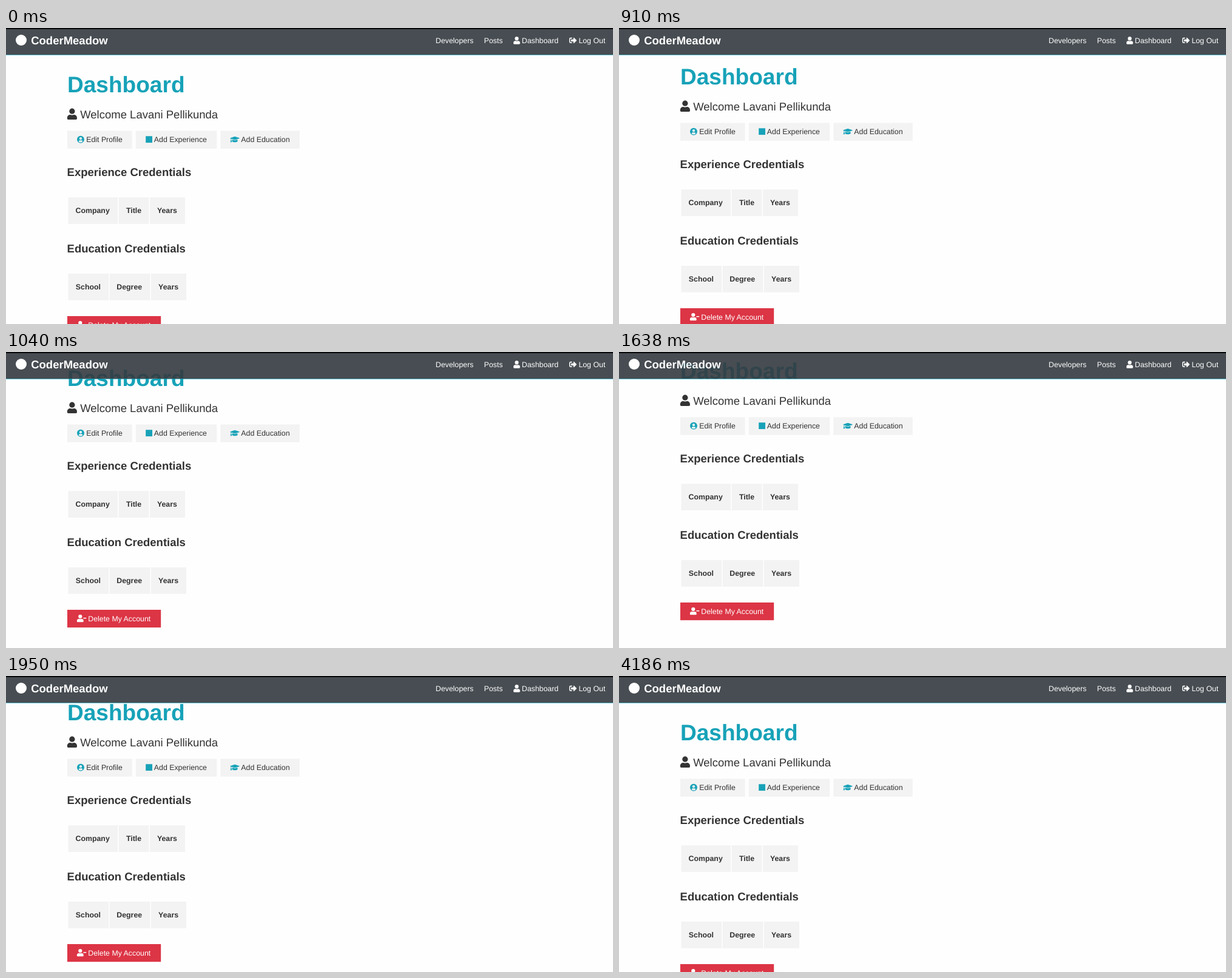
These frames come from a looping animation (1000 by 488 pixels, 5.59 s). An HTML page:

```html
<!DOCTYPE html>
<html lang="en">
<head>
<meta charset="utf-8">
<title>Dashboard</title>
<style>
  html, body { margin: 0; width: 100%; height: 100%; overflow: hidden; background: #fefefe; }
  svg { display: block; width: 100%; height: 100%; }
  text { font: 12.35px "Liberation Sans", Arial, sans-serif; text-rendering: geometricPrecision; }
  .large { font-size: 18.5px; }
  .bold { font-weight: bold; }
  .title { font-size: 37.1px; font-weight: bold; }
  .teal { fill: #17a2b8; }
  .white { fill: #fff; }
  .panel { fill: #f3f3f3; }
</style>
</head>
<body>
<svg viewBox="0 0 1000 488">
  <defs>
    <!-- Icons are drawn on a 512-unit em square. -->
    <g id="user">
      <circle cx="224" cy="128" r="128"/>
      <path d="M134 288h17a175 175 0 0 0 146 0h17A134 134 0 0 1 448 422v42a48 48 0 0 1-48 48H48a48 48 0 0 1-48-48v-42A134 134 0 0 1 134 288z"/>
    </g>
    <g id="userMinus">
      <use href="#user"/>
      <rect x="432" y="208" width="208" height="64" rx="16"/>
    </g>
    <g id="userCircle">
      <circle cx="248" cy="256" r="248"/>
      <g class="panel">
        <circle cx="248" cy="192" r="88"/>
        <path d="M106 392a122 122 0 0 1 94-80q48 16 96 0a122 122 0 0 1 94 80a192 192 0 0 1-284 0z"/>
      </g>
    </g>
    <g id="cap">
      <path d="M297 67a80 80 0 0 1 46 0l279 86q36 23 0 46L343 285a80 80 0 0 1-46 0L18 199q-36-23 0-46z"/>
      <path d="M145 272l143 44a110 110 0 0 0 64 0l143-44 17 112c0 35-86 64-192 64s-192-29-192-64z"/>
      <path d="M48 200h32v112a32 32 0 0 1 14 46l26 90H8l26-90a32 32 0 0 1 14-46z"/>
    </g>
    <g id="signOut">
      <path d="M497 273L329 441c-15 15-41 4-41-17v-96H152a24 24 0 0 1-24-24v-96a24 24 0 0 1 24-24h136V88c0-21 26-32 41-17l168 168a24 24 0 0 1 0 34z"/>
      <path d="M192 96H96a64 64 0 0 0-64 64v192a64 64 0 0 0 64 64h96" fill="none" stroke="#fff" stroke-width="64"/>
    </g>
  </defs>

  <rect width="1000" height="488" fill="#fefefe"/>

  <g id="page" fill="#333">
    <text class="title teal" x="100.9" y="106.3">Dashboard</text>
    <use href="#user" transform="translate(100.8 132.6) scale(.0361)"/>
    <text class="large" x="122.2" y="148.8">Welcome Lavani Pellikunda</text>

    <g class="panel">
      <rect x="101" y="169.5" width="106.7" height="29.3"/>
      <rect x="213.7" y="169.5" width="133.5" height="29.3"/>
      <rect x="353.3" y="169.5" width="130.5" height="29.3"/>
    </g>
    <g class="teal">
      <use href="#userCircle" transform="translate(117 177.5) scale(.0241)"/>
      <rect x="230.2" y="178.3" width="10.8" height="10.8"/>
      <use href="#cap" transform="translate(369.3 177.5) scale(.0241)"/>
    </g>
    <text x="132.2" y="188.3">Edit Profile</text>
    <text x="243.8" y="188.3">Add Experience</text>
    <text x="387.3" y="188.3">Add Education</text>

    <text class="large bold" x="100.6" y="244.2">Experience Credentials</text>
    <g class="panel">
      <rect x="102.6" y="279.2" width="81.4" height="43.8"/>
      <rect x="185.6" y="279.2" width="49.8" height="43.8"/>
      <rect x="237" y="279.2" width="58" height="43.8"/>
    </g>
    <text class="bold" x="114.5" y="305.3">Company</text>
    <text class="bold" x="197.9" y="305.3">Title</text>
    <text class="bold" x="248.9" y="305.3">Years</text>

    <text class="large bold" x="100.6" y="370.1">Education Credentials</text>
    <g class="panel">
      <rect x="102.6" y="405" width="66.6" height="43.8"/>
      <rect x="170.7" y="405" width="66.8" height="43.8"/>
      <rect x="239" y="405" width="58" height="43.8"/>
    </g>
    <text class="bold" x="114.8" y="431.1">School</text>
    <text class="bold" x="182.3" y="431.1">Degree</text>
    <text class="bold" x="251.1" y="431.1">Years</text>

    <rect x="101" y="475" width="154.2" height="29.2" fill="#dc3545"/>
    <use class="white" href="#userMinus" transform="translate(116.9 483) scale(.0241)"/>
    <text class="white" x="135.3" y="493.7">Delete My Account</text>
  </g>

  <g opacity=".9">
    <rect width="1000" height="44" fill="#343a40"/>
    <rect class="teal" y="44" width="1000" height=".8"/>
    <g class="white">
      <circle cx="25" cy="20" r="9"/>
      <text class="large bold" x="41.2" y="27">CoderMeadow</text>
      <text x="707.8" y="25">Developers</text>
      <text x="787.5" y="25">Posts</text>
      <use href="#user" transform="translate(836 14.3) scale(.0241)"/>
      <text x="849.8" y="25">Dashboard</text>
      <use href="#signOut" transform="translate(927.9 14.3) scale(.0241)"/>
      <text x="943.4" y="25">Log Out</text>
    </g>
  </g>
  <rect width="1000" height="1.8"/>
</svg>
<script>
  const LOOP = 5590;
  // Scroll position in px from each start time in ms.
  const SCROLL_STEPS = [[0, 0], [910, 13], [1040, 50], [1170, 62], [1950, 33], [2080, 0]];
  const page = document.getElementById("page");
  const start = performance.now();

  function draw(now) {
    const time = Math.max(0, now - start) % LOOP;
    const [, scroll] = SCROLL_STEPS.findLast(([from]) => from <= time);
    page.setAttribute("transform", `translate(0 ${-scroll})`);
    requestAnimationFrame(draw);
  }
  draw(start);
</script>
</body>
</html>
```
